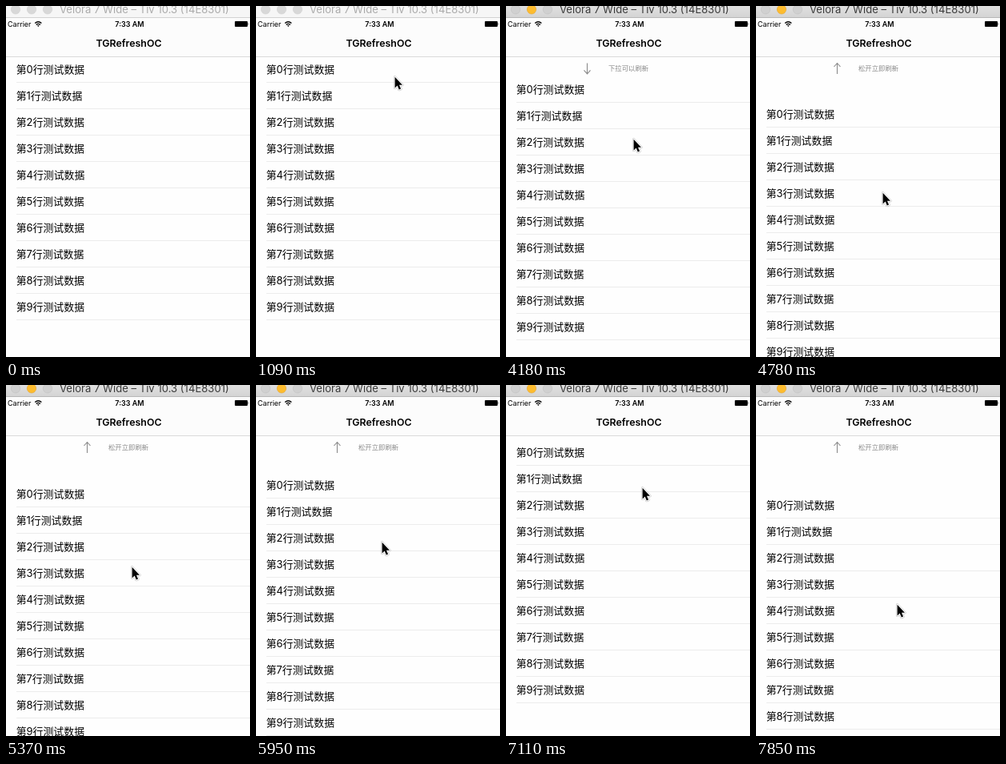
An HTML page that plays this animation: 305 by 439 pixels, repeating every 8 s.

```html
<!DOCTYPE html>
<html lang="zh-CN">
<head>
<meta charset="utf-8">
<title>TGRefreshOC</title>
<style>
  html, body { margin: 0; width: 100%; height: 100%; overflow: hidden; background: #fff; }
  svg { display: block; width: 305px; height: 439px; }
  text { font-family: Inter, "Noto Sans CJK SC", "Noto Sans CJK", sans-serif; fill: #000; white-space: pre; }
  .row { font-size: 12.9px; }
  .tip { font-size: 8.4px; fill: #8a8a8a; }
  .small { font-size: 9px; }
  .bold { font-weight: 600; }
  #bar rect { fill: #f6f6f6; }
  #bar text { font-size: 13.1px; fill: #aaa; }
  #bar circle { fill: #d8d8d8; stroke: #cfcfcf; stroke-width: .6; }
  #bar path { stroke: #d2d2d2; }
  #bar.on rect { fill: url(#active); }
  #bar.on text { fill: #3a3a3a; }
  #bar.on circle { fill: #d0d0d0; stroke: #c0c0c0; }
  #bar.on .min { fill: #fdbc2f; stroke: #e3a530; }
  #bar.on path { stroke: #b8b8b8; }
</style>
</head>
<body>
<svg viewBox="0 0 305 439" xmlns="http://www.w3.org/2000/svg">
  <defs>
    <linearGradient id="active" x2="0" y2="1"><stop stop-color="#e0e0e0"/><stop offset="1" stop-color="#d4d4d4"/></linearGradient>
  </defs>
  <rect width="305" height="439" fill="#fefefe"/>

  <g id="header">
    <path id="arrow" d="M101.5 85V71.5M97.5 76L101.5 71.5L105.5 76" fill="none" stroke="#8a8a8a" stroke-width="1.1"/>
    <text id="tip" class="tip" x="128" y="81"></text>
  </g>

  <g id="list"><rect y="63" width="305" height="440" fill="#fefefe"/></g>

  <rect y="14" width="305" height="49" fill="#fcfcfc"/>
  <path d="M0 63.5H305" stroke="#dadada"/>
  <text class="small" x="2" y="26">Carrier</text>
  <g fill="none" stroke="#000" stroke-width="1.3">
    <path d="M36.2 21.6Q40.3 18 44.4 21.6M37.7 23.4Q40.3 21.2 42.9 23.4"/>
    <path d="M39 24.5Q40.3 23.6 41.6 24.5L40.3 26Z" fill="#000" stroke="none"/>
  </g>
  <text class="small bold" x="154.5" y="26" text-anchor="middle">7:33 AM</text>
  <rect x="286" y="19" width="16" height="7" rx="1"/>
  <path d="M302.6 21q1.6 1.5 0 3z"/>
  <text class="bold" x="153.5" y="51" font-size="12.4" text-anchor="middle">TGRefreshOC</text>

  <g id="bar">
    <rect width="305" height="14"/>
    <path d="M0 14.5H305"/>
    <circle cx="12" cy="4.3" r="5.7"/>
    <circle class="min" cx="32" cy="4.3" r="5.7"/>
    <circle cx="52" cy="4.3" r="5.7"/>
    <text x="67" y="9.3">Velora 7 Wide – Tiv 10.3 (14E8301)</text>
  </g>

  <g id="cursor" stroke-linejoin="round">
    <path id="pointer" d="M.6 .8V14.4L3.7 11.6L5.8 16.6L8.1 15.6L6 10.8H10Z" stroke="#000" stroke-opacity=".2" stroke-width="3.4"/>
    <path id="tipfill" stroke="#fff" stroke-width="2" paint-order="stroke"/>
  </g>
</svg>
<script>
const LOOP = 8000, START = 492, TICK = 147;
const ROWS = 10, PITCH = 33, RELEASE_AT = 41, FOCUS_TICK = 6;
const $ = id => document.getElementById(id);

$('tipfill').setAttribute('d', $('pointer').getAttribute('d'));
$('list').innerHTML += Array.from({ length: ROWS }, (_, i) => {
  const y = 63 + i * PITCH;
  return `<text class="row" x="12.7" y="${y + 21}">第${i}行测试数据</text>` +
    `<path d="M13 ${y + 32.5}H305" stroke="#ececec"/>`;
}).join('');

// Key points: [tick, cursor x, cursor y, list pull]
const keys = [
  [0, 291, 88, 0], [1, 224, 97, 0], [2, 224, 97, 0], [4, 173, 88, 0],
  [9, 161, 84, 0], [10, 161, 84, 0], [15, 160, 119, 0],
  [18, 159, 109, 0], [21, 159, 109, 0],
  [29, 158, 233, 56], [37, 157, 196, 46], [45, 170, 128, 5], [50, 176, 274, 71]
];
const LAST = keys[keys.length - 1][0];

// Tangent of channel c at key i; rests stay at rest
function slope(i, c) {
  const key = keys[i], prev = keys[i - 1], next = keys[i + 1];
  if (prev?.[c] === key[c] || next?.[c] === key[c]) return 0;
  const a = prev || key, b = next || key;
  return (b[c] - a[c]) / (b[0] - a[0]);
}

// Smooth curve through the key points
function along(tick, c) {
  const j = Math.max(1, keys.findIndex(k => k[0] >= tick));
  const a = keys[j - 1], b = keys[j], span = b[0] - a[0];
  const u = (tick - a[0]) / span, v = 1 - u;
  return Math.round(a[c] * v * v * (1 + 2 * u) + b[c] * u * u * (1 + 2 * v) +
    span * u * v * (slope(j - 1, c) * v - slope(j, c) * u));
}

function draw(t) {
  const now = Math.min(LAST, Math.floor((t - START) / TICK));
  const [x, y, pull] = [1, 2, 3].map(c => along(Math.max(0, now), c));
  const ready = pull >= RELEASE_AT;
  $('cursor').setAttribute('visibility', now < 0 ? 'hidden' : 'visible');
  $('cursor').setAttribute('transform', `translate(${x} ${y})`);
  $('list').setAttribute('transform', `translate(0 ${pull})`);
  $('header').setAttribute('visibility', pull ? 'visible' : 'hidden');
  $('arrow').setAttribute('transform', ready ? '' : 'rotate(180 101.5 78.2)');
  $('tip').textContent = ready ? '松开立即刷新' : '下拉可以刷新';
  $('bar').setAttribute('class', now >= FOCUS_TICK ? 'on' : '');
}

const began = performance.now();
function frame() {
  draw((performance.now() - began) % LOOP);
  requestAnimationFrame(frame);
}
frame();
</script>
</body>
</html>
```
